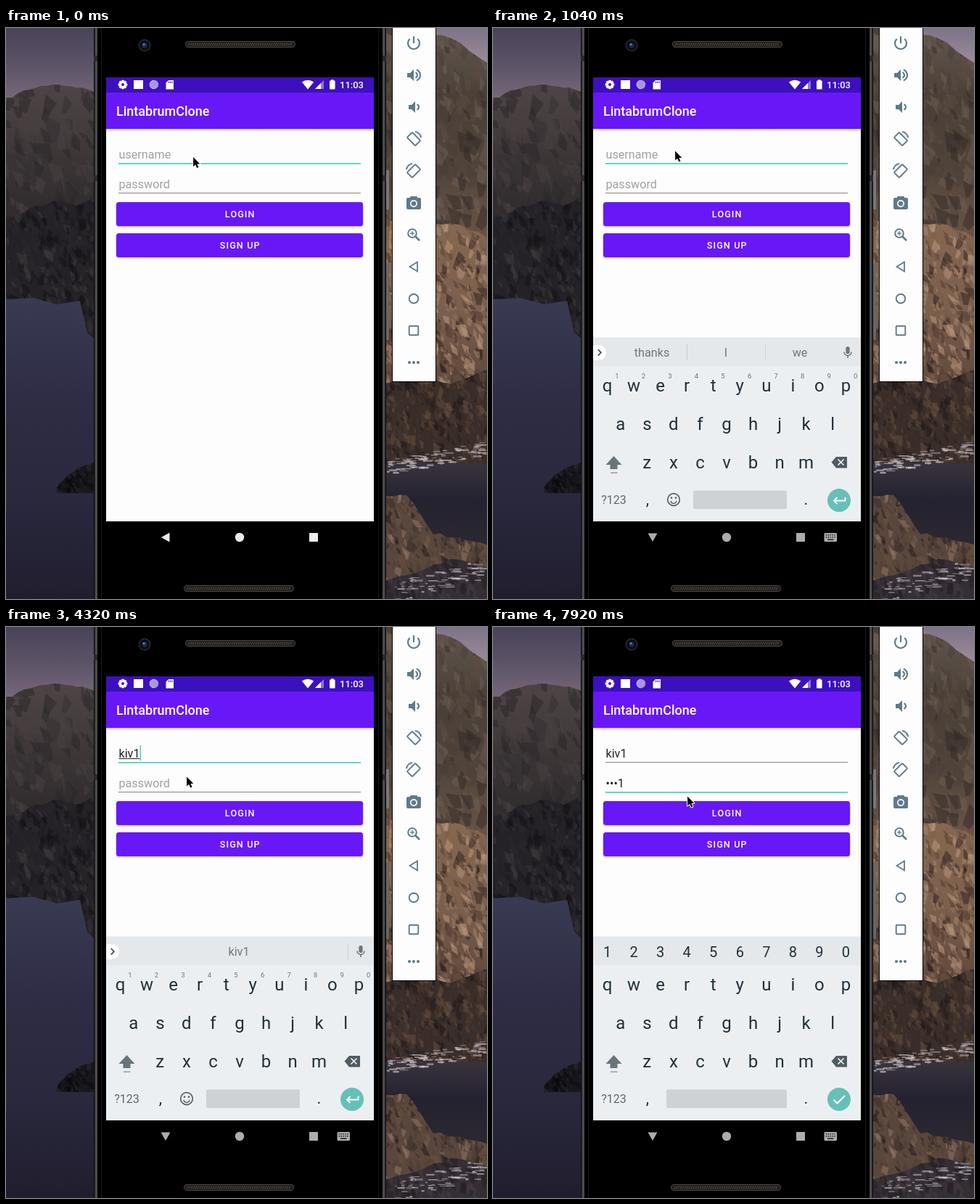
An HTML page with a canvas that plays this animation: 663 px wide and 787 px high, repeating every 8000 ms.

```html
<!DOCTYPE html>
<html lang="en">
<head>
<meta charset="utf-8">
<title>Login screen</title>
<style>
html, body { margin: 0; width: 100%; height: 100%; overflow: hidden; background: #000; }
canvas { display: block; }
</style>
</head>
<body>
<canvas id="stage" width="663" height="787"></canvas>
<script>
const W = 663, H = 787, LOOP = 8000;
const PURPLE = '#6818f6', BAR = '#3c10bf', TEAL = '#46d6c2', SLATE = '#5f7a8a';
const view = document.getElementById('stage').getContext('2d');
const makeLayer = () => Object.assign(document.createElement('canvas'), { width: W, height: H }).getContext('2d');
const scene = makeLayer(), keys = makeLayer();
let g = scene;

// ---------- drawing helpers ----------
function rect(x, y, w, h, color, r = 0) {
  g.fillStyle = color;
  g.beginPath();
  g.roundRect(x, y, w, h, r);
  g.fill();
}
function frame(x, y, w, h, color, width, r = 0) {
  g.strokeStyle = color;
  g.lineWidth = width;
  g.beginPath();
  g.roundRect(x, y, w, h, r);
  g.stroke();
}
function trace(pts, close) {
  g.beginPath();
  for (let i = 0; i < pts.length; i += 2) g.lineTo(pts[i], pts[i + 1]);
  if (close) g.closePath();
}
function poly(color, ...pts) {
  trace(pts, true);
  g.fillStyle = color;
  g.fill();
}
function line(color, width, ...pts) {
  trace(pts, false);
  g.strokeStyle = color;
  g.lineWidth = width;
  g.stroke();
}
function disc(x, y, r, color) {
  g.fillStyle = color;
  g.beginPath();
  g.arc(x, y, r, 0, 7);
  g.fill();
}
function arc(x, y, r, color, width, from = 0, to = Math.PI * 2) {
  g.strokeStyle = color;
  g.lineWidth = width;
  g.beginPath();
  g.arc(x, y, r, from, to);
  g.stroke();
}
function text(str, x, y, size, color, align = 'left', weight = 400, spacing = 0) {
  g.font = `${weight} ${size}px Roboto, sans-serif`;
  g.letterSpacing = spacing + 'px';
  g.textAlign = align;
  g.fillStyle = color;
  g.fillText(str, x, y);
  return g.measureText(str).width;
}
function at(x, y, angle, draw) {
  g.save();
  g.translate(x, y);
  g.rotate(angle);
  draw();
  g.restore();
}
function fade(y0, y1, ...colors) {
  const grad = g.createLinearGradient(0, y0, 0, y1);
  colors.forEach((c, i) => grad.addColorStop(i / (colors.length - 1), c));
  return grad;
}

// ---------- landscape ----------
let seed = 7;
const rnd = () => (seed = (seed * 16807) % 2147483647) / 2147483647;
const pick = list => list[Math.floor(rnd() * list.length)];

// Land below a rough ridge of evenly spaced heights, strewn with rock facets.
function land(x0, x1, base, heights, fill, size, tints) {
  const top = Math.min(...heights), last = heights.length - 1, outline = [x0, base];
  for (let i = 0; i <= last * 4; i++) {
    const k = i / 4, a = heights[Math.floor(k)], b = heights[Math.min(last, Math.ceil(k))];
    outline.push(x0 + (x1 - x0) * k / last, a + (b - a) * (k % 1) + (rnd() - 0.5) * 4);
  }
  outline.push(x1, base);
  poly(fill, ...outline);
  g.save();
  g.clip();
  g.globalAlpha = 0.5;
  const count = (x1 - x0) * (base - top) / (size * size) * 1.2;
  for (let i = 0; i < count; i++) {
    const s = size * (0.3 + rnd());
    at(x0 + rnd() * (x1 - x0), top + rnd() * (base - top), 0.6 + rnd(), () =>
      poly(pick(tints), -s, 0, 0, -s * rnd(), s, 0, s * rnd(), s * 0.5));
  }
  g.restore();
}
function foam(count, x0, y0, x1, y1, spread) {
  for (let i = 0; i < count; i++) {
    const k = rnd();
    g.globalAlpha = 0.25 + rnd() * 0.5;
    rect(x0 + (x1 - x0) * k, y0 + (y1 - y0) * k + (rnd() - 0.5) * spread, 3 + rnd() * 11, 1 + rnd() * 2, '#cdc6cc', 1);
  }
  g.globalAlpha = 1;
}
function landscape() {
  rect(0, 0, 130, 120, fade(0, 100, '#494359', '#5c5367', '#77697a'));
  land(0, 130, 300, [98, 84, 77, 81, 90], fade(77, 300, '#4f4546', '#3b3435', '#282528'), 16, ['#2b2628', '#4a4142', '#353032']);
  land(0, 130, 440, [262, 250, 238, 244, 232], '#242226', 9, ['#3f3a3e', '#121115', '#2b282c', '#1b191d']);
  poly(fade(370, H, '#3a3a53', '#2e2d45', '#29283d', '#201e2e'), 0, 374, 38, 372, 70, 381, 102, 376, 112, 420, 130, 436, 130, H, 0, H);
  land(70, 130, 641, [634, 612, 601, 600], '#17161b', 7, ['#2d2a30', '#09090c']);

  const tan = ['#a98871', '#2c211e', '#7b5f4e', '#50392e', '#c09c80'];
  const dark = ['#1e1817', '#67503f', '#382b27', '#4d3b33'];
  rect(515, 0, 148, 60, fade(0, 45, '#7d7388', '#988a97'));
  land(515, 663, 290, [0, 2, 14, 46], fade(0, 290, '#63574f', '#4a4038', '#51443a', '#6a5446'), 14, ['#332b28', '#6f5f54', '#4a3f38', '#5d4c40']);
  land(515, 663, 510, [262, 275, 268, 288], fade(262, 510, '#86684f', '#7c604d', '#5a4438'), 9, tan);
  land(515, 663, 620, [490, 482, 490, 470], '#3a2e2a', 8, dark);
  rect(515, 600, 148, 187, fade(600, 700, '#38343d', '#242230', '#2a2730'));
  foam(90, 522, 604, 658, 580, 20);
  land(515, 663, 765, [646, 642, 696, 704, 712], '#59463d', 8, ['#957767', ...dark]);
  land(515, 663, H, [762, 750, 732, 742], '#352e34', 9, ['#241f25', '#453c42']);
  foam(75, 535, 776, 655, 745, 28);
}

// ---------- phone and side panel ----------
function grille(x, y) {
  rect(x, y, 152, 9, '#4b4543', 4.5);
  rect(x + 1, y + 1, 150, 7, '#211d1c', 3.5);
  for (let i = 4; i < 148; i += 3) line('#5b514c', 1, x + i, y + 6.5, x + i + 2, y + 2.5);
}
function phone() {
  rect(524, 196, 4, 54, '#77777a', 1);
  rect(524, 325, 4, 105, '#66666a', 1);
  rect(121, 0, 403, H, '#0c0c0d');
  rect(122.5, 0, 400, H, '#4b4b4e');
  rect(126, 0, 393, H, '#000');
  for (const side of [-1, 1]) {
    const edge = 322.5 + side * 199;
    line('#1a1a1c', 1, edge - side * 8, 0, edge - side * 8, H);
    for (const y of [38, 203]) rect(edge - 2.5, y, 5, 8, '#29292b');
  }
  disc(191, 24, 8.5, '#2b2c30');
  disc(191, 24, 7, '#0c0d13');
  disc(191, 24, 3.5, '#1c2b50');
  disc(190, 22.5, 1.5, '#5f80b4');
  grille(247, 18);
  grille(245, 768);
}
function speaker(x, y, waves) {
  poly(SLATE, x, y - 3, x + 4, y - 3, x + 9, y - 8, x + 9, y + 8, x + 4, y + 3, x, y + 3);
  for (let i = 1; i <= waves; i++) arc(x + 10, y, i * 4, SLATE, 2.2, -1.2, 1.2);
}
function rotateIcon(y, side) {
  at(562, y, side * Math.PI / 4, () => {
    frame(-8, -5, 16, 10, SLATE, 1.9, 1);
    arc(0, 0, 10.3, SLATE, 1.9, -Math.PI / 2 - 0.6, -Math.PI / 2 + 0.6);
  });
}
function panel() {
  const x = 562, c = SLATE;
  rect(532, -2, 61, 490, '#000');
  rect(533, -2, 59, 489, '#fdfdfd');
  arc(x, 21, 8, c, 2.2, -0.85, Math.PI + 0.85);
  line(c, 2.2, x, 11.5, x, 21);
  speaker(553, 65, 2);
  speaker(555, 109, 1);
  rotateIcon(153, 1);
  rotateIcon(197, -1);
  rect(552, 234, 20, 16, c, 2);
  rect(557, 232, 10, 5, c, 1);
  disc(x, 242, 5, '#fdfdfd');
  disc(x, 242, 3.3, c);
  arc(560, 283, 5.8, c, 2);
  line(c, 2.6, 564.5, 287.5, 570, 293);
  line(c, 1.4, 557, 283, 563, 283);
  line(c, 1.4, 560, 280, 560, 286);
  line(c, 1.8, 567, 322.5, 556.5, 329, 567, 335.5, 567, 321.5);
  arc(x, 373, 6.3, c, 1.9);
  frame(555.7, 410.7, 12.6, 12.6, c, 1.9, 1);
  for (const dx of [-6, 0, 6]) disc(x + dx, 461, 2.1, c);
}

// ---------- app ----------
function statusBar() {
  rect(138, 68, 369, 21, BAR);
  for (let i = 0; i < 8; i++) at(161, 78, i * Math.PI / 4, () => rect(-1.7, -6.3, 3.4, 4, '#fff', 0.5));
  arc(161, 78, 3.4, '#fff', 2.8);
  rect(176, 72, 13, 12, '#fff');
  disc(204, 78, 6.2, '#a896e2');
  arc(204, 78, 5.8, '#c9bdf0', 1, 1.6, 4.7);
  poly('#fff', 224, 72, 231, 72, 231, 84.5, 220.5, 84.5, 220.5, 75.5);
  for (let i = 0; i < 3; i++) rect(224 + i * 2.3, 73.4, 1.1, 2.6, BAR);
  g.fillStyle = '#fff';
  g.beginPath();
  g.moveTo(416, 84.5);
  g.lineTo(407.8, 74.5);
  g.quadraticCurveTo(416, 68.8, 424.2, 74.5);
  g.fill();
  poly('#8d74da', 438, 72, 438, 84, 426, 84);
  poly('#fff', 434, 76, 434, 84, 426, 84);
  rect(446, 72.5, 7.6, 12, '#fff', 1);
  rect(448, 71.3, 3.6, 2, '#fff');
  text('11:03', 460, 83, 13, '#fff', 'left', 500);
}
function button(label, y) {
  g.save();
  g.shadowColor = 'rgba(0,0,0,0.3)';
  g.shadowBlur = 3;
  g.shadowOffsetY = 1;
  rect(152, y, 340, 33, PURPLE, 3.5);
  g.restore();
  text(label, 322.7, y + 21.3, 12.6, '#fff', 'center', 500, 1.1);
}
function app() {
  rect(138, 68, 369, 612, '#fdfdfd');
  rect(138, 139, 369, 4, fade(139, 143, '#cbc9ce', '#fdfdfd'));
  statusBar();
  rect(138, 89, 369, 50, PURPLE);
  text('LintabrumClone', 152, 121, 18, '#fff', 'left', 500);
  button('LOGIN', 240);
  button('SIGN UP', 283);
}
function field(y, hint, value, focused, caret, composing) {
  const x = 155.5;
  rect(155, y + 6, 334, focused ? 1.8 : 1, focused ? TEAL : '#858585');
  const w = text(value || hint, x, y, 16.16, value ? '#212121' : '#a0a0a0');
  if (value && composing) rect(x, y + 1, w, 1, '#212121');
  if (focused && caret) rect(x + (value ? w : 0), y - 17, 1.6, 21.5, TEAL);
}

// ---------- keyboard ----------
const INK = '#20303a', DIM = '#6c767c', ICON = '#56636a';
const keyX = i => 157.5 + i * 36.55;
function suggestions(words) {
  rect(130, 437, 26, 21, '#fff', 10.5);
  line('#3d474d', 1.7, 144.8, 443, 148.8, 447.3, 144.8, 451.6);
  const single = words.length === 1;
  words.forEach((word, i) =>
    text(word, single ? 321 : 219 + i * 102, 453, 16.2, DIM, 'center', /^K/.test(word) ? 700 : 400));
  for (const x of single ? [471] : [267, 375]) rect(x, 436, 1, 22, '#c9ced1');
  rect(486.4, 439, 5.2, 10, DIM, 2.6);
  arc(489, 446.5, 5, DIM, 1.5, 0, Math.PI);
  line(DIM, 1.6, 489, 451.5, 489, 455);
}
function keyboard(words) {
  g = keys;
  g.clearRect(0, 0, W, H);
  rect(138, 426.5, 369, 320, '#eceff1');
  rect(138, 426.5, 369, 39.5, '#e5e8ea');
  [...'1234567890'].forEach((d, i) => words
    ? text(d, keyX(i) + 13.3, 482.5, 9.5, DIM, 'center')
    : text(d, keyX(i), 455, 20, INK, 'center'));
  if (words) suggestions(words);
  ['qwertyuiop', ' asdfghjkl', '   zxcvbnm'].forEach((row, r) => {
    const pad = row.lastIndexOf(' ') + 1;
    [...row.trim()].forEach((ch, i) => text(ch, keyX(pad / 2 + i), 501 + r * 52.8, 24, INK, 'center'));
  });

  poly('#6a757b', 166.5, 590, 177.5, 602, 171.5, 602, 171.5, 608, 161.5, 608, 161.5, 602, 155.5, 602);
  rect(162, 612.5, 9.5, 1.2, '#7c868b');
  poly('#4f5c63', 466.5, 598.5, 473, 591, 488, 591, 488, 606.5, 473, 606.5);
  line('#eceff1', 1.7, 475.5, 594.5, 483.5, 602.5);
  line('#eceff1', 1.7, 483.5, 594.5, 475.5, 602.5);

  text('?123', 166.5, 656, 16, '#5b686f', 'center');
  text(',', 213, 657, 22, INK, 'center');
  text('.', 431.5, 657, 22, INK, 'center');
  const left = words ? 276 : 239;
  rect(left, 637.5, 405 - left, 25.5, '#ced2d5', 2.5);
  disc(477, 651, 16, '#66c0b7');
  if (words) {
    arc(249, 650, 8.3, ICON, 1.7);
    for (const dx of [-3, 3]) disc(249 + dx, 647.6, 1.3, ICON);
    arc(249, 651, 4.2, ICON, 1.5, 0.2, Math.PI - 0.2);
    line('#fff', 1.8, 485.5, 646.5, 485.5, 651.5, 470, 651.5);
    line('#fff', 1.8, 474.5, 647, 470, 651.5, 474.5, 656);
  } else line('#fff', 2, 469.5, 651.5, 474.5, 656.5, 485, 646);
  g = view;
}
function navBar(color, turn, showKeys) {
  at(220, 702, -turn * Math.PI / 2, () => poly(color, -6, 0, 5.5, -6.5, 5.5, 6.5));
  disc(322, 702, 6.2, color);
  rect(418, 696, 12, 12, color);
  if (!showKeys) return;
  rect(456.5, 696, 17.5, 12, color, 1.5);
  for (let i = 0; i < 10; i++) rect(458.6 + (i % 5) * 2.9, i < 5 ? 698 : 701, 1.6, 1.6, '#222');
  rect(461, 704.3, 8.5, 1.6, '#222');
}
function pointer(x, y) {
  at(x, y, 0, () => {
    const shape = [0.8, 1, 0.8, 14, 3.8, 11.3, 6, 16, 8.2, 15, 6.1, 10.4, 10, 10.2];
    g.lineJoin = 'round';
    trace(shape, true);
    g.strokeStyle = '#fff';
    g.lineWidth = 2;
    g.stroke();
    poly('#000', ...shape);
  });
}

// ---------- timeline ----------
const TICK = 149.4;
const TAP = 290, REFOCUS = 4450;  // the two fields gain focus
const LOGIN = 'kiv1';             // typed into both fields
const NAME_KEYS = [1700, 1860, 2170, 3100], PASS_KEYS = [5320, 6100, 6360, 6950];
const HINTS = ['thanks I we', 'k know keep', 'ki kind dim', 'kiv Kiv him', 'kiv1'].map(s => s.split(' '));
const EVENTS = [TAP, ...NAME_KEYS, REFOCUS, ...PASS_KEYS];

const ramp = (t, from, to) => Math.min(1, Math.max(0, (t - from) / (to - from)));
const ease = k => k * k * (3 - 2 * k);
const typed = (t, times) => times.filter(k => k <= t).length;

// The caret blinks every half second, starting afresh at each input.
function caretOn(t) {
  const last = Math.max(...EVENTS.filter(e => e <= t));
  return t >= TAP && Math.floor((t - last) / 500) % 2 === 0;
}
function pointerAt(t) {
  const a = ease(ramp(t, 50, 290)), b = ease(ramp(t, 3750, 4180)), c = ramp(t, 7800, 7910);
  return [257.3 - 7 * a - 2 * b + 19 * c, 177 - 8.5 * a + 37 * b + 27 * c];
}

function draw(time) {
  const t = Math.floor((time + 12) / TICK) * TICK;
  g = view;
  g.drawImage(scene.canvas, 0, 0);
  const onPass = t >= REFOCUS, caret = caretOn(t), n = typed(t, PASS_KEYS);
  field(180, 'username', LOGIN.slice(0, typed(t, NAME_KEYS)), !onPass, caret, !onPass);
  field(221, 'password', n ? '•'.repeat(n - 1) + LOGIN[n - 1] : '', onPass, caret, false);

  const shown = ramp(t, 724, 1045);
  if (shown) {
    keyboard(onPass ? null : HINTS[typed(t - 60, NAME_KEYS)]);
    g.save();
    g.beginPath();
    g.rect(138, 68, 369, shown < 1 ? 656 : 612);
    g.clip();
    g.globalAlpha = shown;
    g.drawImage(keys.canvas, 0, (1 - shown) * 136);
    g.restore();
  }
  navBar(t < TAP ? '#ececec' : 'rgba(255,255,255,0.68)', ramp(t, 500, 745), shown > 0);
  pointer(...pointerAt(t));
}

landscape();
phone();
panel();
app();

const begin = performance.now();
function tick() {
  draw((performance.now() - begin) % LOOP);
  requestAnimationFrame(tick);
}
tick();
</script>
</body>
</html>
```
